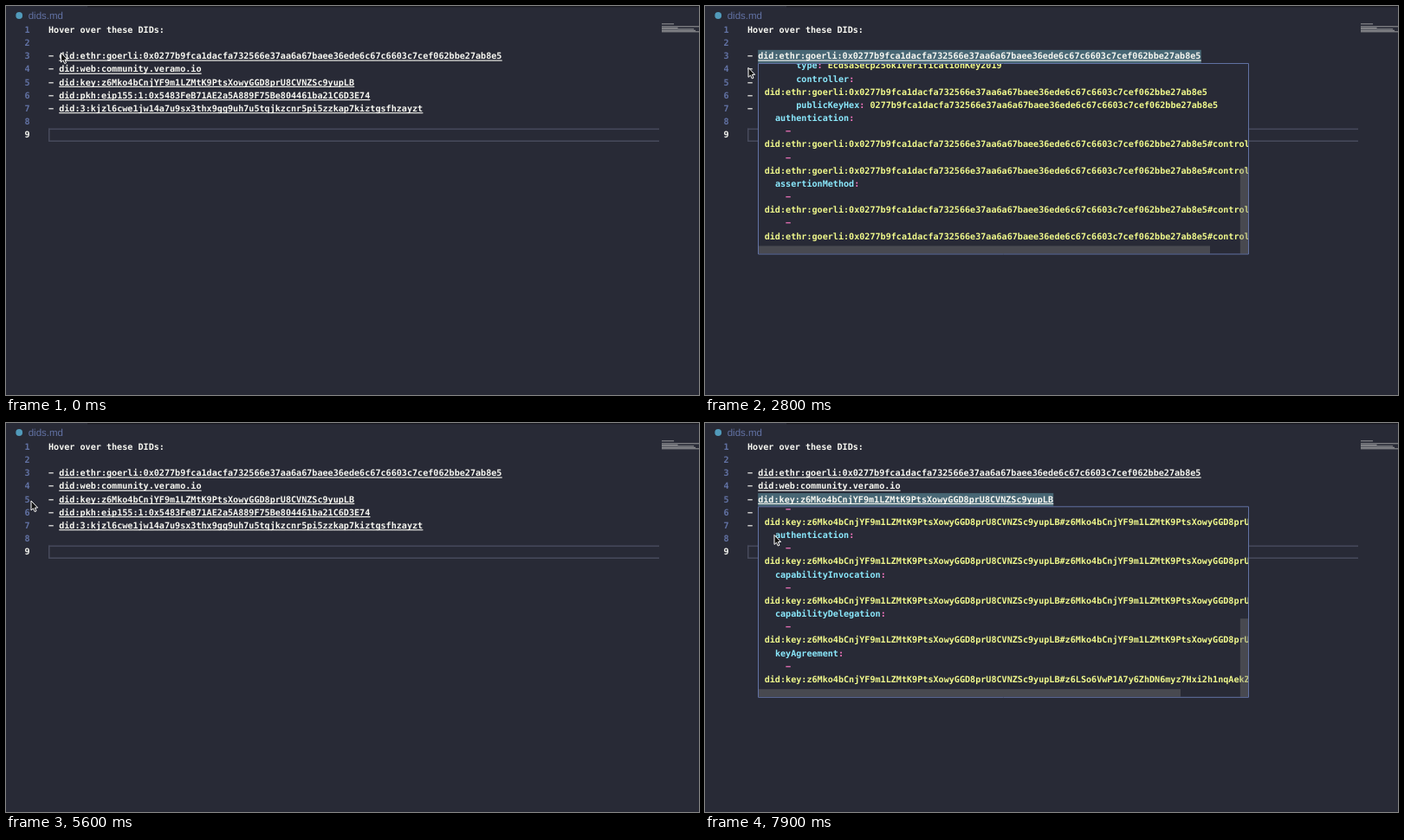
Recreate the animation shown at these times as an HTML page with a canvas. Size 800x450 px, loop 8 s.

```html
<!DOCTYPE html>
<html lang="en">
<head>
<meta charset="utf-8">
<title>dids.md</title>
<style>
html, body { margin: 0; width: 100%; height: 100%; overflow: hidden; background: #282a36; }
canvas { display: block; }
</style>
</head>
<body>
<canvas width="800" height="450"></canvas>
<script>
const ctx = document.querySelector('canvas').getContext('2d');
const LOOP = 8000, PITCH = 15.16, CHAR = 6.09;
const BG = '#282a36', WHITE = '#f8f8f2', BLUE = '#6272a4', LINE = '#474a5c';
const CYAN = '#8be9fd', PINK = '#ff79c6', YELLOW = '#f1fa8c';
const MONO = 'bold 10.115px "DejaVu Sans Mono", monospace';

const hex = '0277b9fca1dacfa732566e37aa6a67baee36ede6c67c6603c7cef062bbe27ab8e5';
const ethr = 'did:ethr:goerli:0x' + hex;
const web = 'did:web:community.veramo.io';
const webHex = '587b01f3044e01e40e17ec76d2e0c8962c11d2a020106f4c2196c02092700b4e';
const webKey = web + '#' + webHex;
const keyId = 'z6Mko4bCnjYF9m1LZMtK9PtsXowyGGD8prU8CVNZSc9yupLB';
const key = 'did:key:' + keyId;
const mainKey = key + '#' + keyId;
const agreeKey = key + '#z6LSo6VwP1A7y6ZhDN6myz7Hxi2h1nqAekZvUtGmRcXbW4sd';

const editor = [
  'Hover over these DIDs:', '', ethr, web, key,
  'did:pkh:eip155:1:0x5483FeB71AE2a5A889F75Be804461ba21C6D3E74',
  'did:3:kjzl6cwe1jw14a7u9sx3thx9gg9uh7u5tqjkzcnr5pi5zzkap7kiztgsfhzayzt', '', ''
];

const refs = (name, ...ids) => [`  ${name}:`, ...ids.flatMap(id => ['    −', id])];
const header = ['didDocumentMetadata: {}', 'didResolutionMetadata:',
  '  contentType: application/did+ld+json', 'didDocument:'];

const ethrDoc = [
  ...header, '  "@context":',
  '    − https://www.w3.org/ns/did/v1',
  '    − https://w3id.org/security/suites/secp256k1recovery-2020/v2',
  '  id: ' + ethr, '  verificationMethod:',
  '    − id:', ethr + '#controller',
  '      type: EcdsaSecp256k1RecoveryMethod2020',
  '      controller:', ethr,
  '      blockchainAccountId: 0x8E2f41C6a9B07d35E4c1F82A60b9D7c3351eA4f0@eip155:5',
  '    − id:', ethr + '#controllerKey',
  '      type: EcdsaSecp256k1VerificationKey2019',
  '      controller:', ethr, '      publicKeyHex: ' + hex,
  ...refs('authentication', ethr + '#controller', ethr + '#controllerKey'),
  ...refs('assertionMethod', ethr + '#controller', ethr + '#controllerKey')
];

const webDoc = [
  ...header, '  "@context": https://w3id.org/did/v1',
  '  id: ' + web, '  verificationMethod:',
  '    − id:', webKey,
  '      type: Ed25519VerificationKey2018',
  '      controller: ' + web, '      publicKeyHex: ' + webHex,
  ...refs('authentication', webKey), ...refs('assertionMethod', webKey),
  ...refs('keyAgreement', webKey),
  '  service:',
  `    − id: ${web}#msg`, '      type: DIDCommMessaging',
  '      serviceEndpoint: https://community.veramo.io/messaging',
  `    − id: ${web}#hub`, '      type: LinkedDomains',
  '      serviceEndpoint: https://community.veramo.io',
  '      description: Community agent'
];

const keyDoc = [
  header[0], 'didResolutionMetadata: {}', 'didDocument:', '  "@context":',
  '    − https://www.w3.org/ns/did/v1',
  '    − https://w3id.org/security/suites/ed25519-2018/v1',
  '    − https://w3id.org/security/suites/x25519-2019/v1',
  '  id: ' + key, '  verificationMethod:',
  '    − id:', mainKey,
  '      type: Ed25519VerificationKey2018', '      controller: ' + key,
  '      publicKeyBase58: 9cLACVHopDWsSs3cTpw2giPySgwHQyDmWUTdcLBxzbYo',
  '    − id:', agreeKey,
  '      type: X25519KeyAgreementKey2019', '      controller: ' + key,
  '      publicKeyBase58: 7mPqWvXJ4TdRk2uNsYb8ZcEh5LgFa3VxQw9iKoBt6SrD',
  ...refs('assertionMethod', mainKey), ...refs('authentication', mainKey),
  ...refs('capabilityInvocation', mainKey), ...refs('capabilityDelegation', mainKey),
  ...refs('keyAgreement', agreeKey)
];

// Scroll keys are [time, fraction of the scroll range].
const hovers = [
  { row: 2, from: 1800, to: 2900, lines: ethrDoc, thumb: 521, scroll: [[2100, 0], [2650, 1]] },
  { row: 3, from: 4400, to: 5400, lines: webDoc, thumb: 555, scroll: [[4650, 0], [5150, 1]] },
  { row: 4, from: 6300, to: 8000, lines: keyDoc, thumb: 487, scroll: [[7500, 0], [7900, 1]] }
];

// Pointer keys are [time, x, y].
const pointer = [
  [0, 63.5, 54], [100, 63, 55], [1850, 63, 55], [2100, 72, 86], [2600, 72, 86],
  [2950, 36, 62], [3200, 42.5, 65.5], [3500, 53, 70], [4000, 67, 71], [4500, 67, 71],
  [4700, 74, 104], [5150, 74, 104], [5450, 27, 92], [5600, 29, 90], [6100, 64, 87],
  [6500, 64, 87], [7200, 80, 129.5]
];

function track(keys, t) {
  const i = keys.findIndex(k => k[0] > t);
  if (i === 0) return keys[0].slice(1);
  if (i < 0) return keys[keys.length - 1].slice(1);
  const a = keys[i - 1], b = keys[i];
  const u = (t - a[0]) / (b[0] - a[0]), e = u * u * (3 - 2 * u);
  return a.slice(1).map((v, n) => v + (b[n + 1] - v) * e);
}

function rect(x, y, w, h, color) {
  ctx.fillStyle = color;
  ctx.fillRect(x, y, w, h);
}

function text(str, x, y, color, font = MONO) {
  ctx.font = font;
  ctx.fillStyle = color;
  ctx.fillText(str, x, y);
}

const baseline = row => 31 + row * PITCH;

function drawEditor(active) {
  rect(0, 0, 800, 450, BG);
  rect(94, 0, 706, 1.3, '#191a21');
  ctx.fillStyle = '#519aba';
  ctx.beginPath();
  ctx.arc(15.2, 11, 3.9, 0, 7);
  ctx.fill();
  text('dids.md', 25.7, 15, BLUE, '11.5px "Liberation Sans", sans-serif');

  rect(49, 141.6, 705, 1.5, LINE);
  rect(49, 155.5, 705, 1.5, LINE);
  rect(49, 141.6, 1.5, 15.4, LINE);

  editor.forEach((line, row) => {
    const y = baseline(row), width = line.length * CHAR;
    const link = line.startsWith('did:');
    text(row + 1, 21.6, y, row === 8 ? WHITE : BLUE);
    if (link) {
      if (active && active.row === row) rect(61.2, y - 10.5, width, PITCH, '#476674');
      text('−', 49, y, WHITE);
      rect(61.2, y + 1.2, width, 1.1, WHITE);
    }
    text(line, link ? 61.2 : 49, y, WHITE);
    const mini = (line.length + (link ? 2 : 0)) * 0.64;
    rect(757, 20.3 + row * 1.5, mini, 1, 'rgba(248,248,242,.55)');
  });
}

function drawYaml(line, x, y) {
  const [, indent, dash, name, value] =
    line.match(/^(\s*)(−\s?)?(?:("?@?\w+"?):(?=\s|$))?(.*)$/);
  x += indent.length * CHAR;
  const put = (str, color) => {
    text(str, x, y, color);
    x += str.length * CHAR;
  };
  if (dash) put(dash, PINK);
  if (name) {
    put(name, name[0] === '"' ? YELLOW : CYAN);
    put(':', PINK);
  }
  put(value, value.trim() === '{}' ? WHITE : YELLOW);
}

function drawHover({ row, lines, thumb, scroll }, t) {
  const top = baseline(row) + 4.7, view = 220;
  const range = lines.length * PITCH - 204;
  const [at] = track(scroll, t);
  ctx.save();
  ctx.beginPath();
  ctx.rect(61.5, top + 0.5, 566, view + 0.5);
  ctx.fillStyle = BG;
  ctx.fill();
  ctx.strokeStyle = BLUE;
  ctx.lineWidth = 1;
  ctx.stroke();
  ctx.beginPath();
  ctx.rect(62, top + 1, 565, view - 0.5);
  ctx.clip();
  lines.forEach((line, i) => {
    drawYaml(line, 68.7, top + 14.7 + i * PITCH - at * range);
  });
  const bar = view * view / (view + range);
  const shade = 'rgba(121,121,121,.4)';
  rect(617.8, top + 1 + at * (view - bar), 9.2, bar, shade);
  rect(62, top + 211.5, thumb, 9, shade);
  ctx.restore();
}

function drawPointer(x, y) {
  ctx.save();
  ctx.translate(x, y);
  ctx.beginPath();
  [[0, 0], [0, 11], [2.5, 8.8], [4.2, 12.6], [6, 11.8], [4.4, 8.1], [7.6, 8]]
    .forEach(p => ctx.lineTo(...p));
  ctx.closePath();
  ctx.fillStyle = '#111';
  ctx.fill();
  ctx.strokeStyle = '#fff';
  ctx.lineWidth = 1;
  ctx.stroke();
  ctx.restore();
}

function frame(now) {
  const t = now % LOOP;
  const active = hovers.find(h => t >= h.from && t < h.to);
  ctx.textRendering = 'geometricPrecision';
  drawEditor(active);
  if (active) drawHover(active, t);
  drawPointer(...track(pointer, t));
  requestAnimationFrame(frame);
}
requestAnimationFrame(frame);
</script>
</body>
</html>
```
